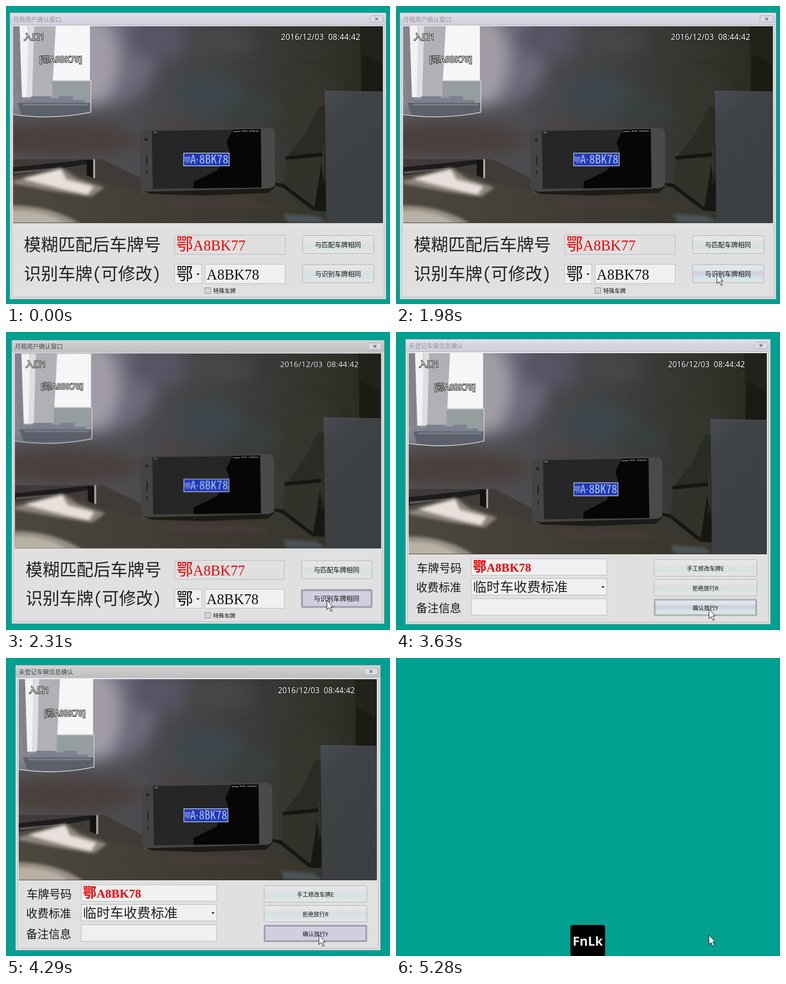
An HTML page for the animation above (6270 ms loop, 819x634 px).

```html
<!DOCTYPE html>
<html lang="zh-CN">
<head>
<meta charset="utf-8">
<title>车牌确认</title>
<style>
html, body { margin: 0; width: 100%; height: 100%; overflow: hidden; background: #00a090; }
svg { display: block; }
text { font-family: "Noto Sans CJK SC", "Noto Sans CJK", sans-serif; fill: #101010; white-space: pre; }
.half { font-family: "Noto Sans Mono CJK SC", "Noto Sans CJK SC", "DejaVu Sans Mono", monospace; }
.song { font-family: "Liberation Serif", "Noto Sans CJK SC", serif; }
.big { font-size: 36.6px; fill: #222; }
.value { font-size: 31px; }
.han { font-size: 36px; }
.mid { font-size: 24px; fill: #181818; }
.caption { font-size: 12.9px; fill: #9696a0; }
.caption.on { fill: #404850; font-weight: 500; }
.push { font-size: 14px; text-anchor: middle; }
.small { font-size: 12px; }
.red { fill: #f00000; }
.overlay { font: 17.3px "Noto Sans", "Noto Sans CJK SC", sans-serif; fill: #fff; stroke: #101010; stroke-width: 2px; paint-order: stroke; }
.button { fill: url(#plain); stroke: #a6aabc; }
.down { fill: #d0cfe0; stroke: #787a8c; }
.field { fill: #f0f0f0; stroke: #b2b4bc; }
.focus { fill: none; stroke: #181818; stroke-dasharray: 1 1; }

/* One loop is 19 ticks of 330 ms */
.step { animation: 6270ms step-end infinite; }
#match { animation-name: match; transform-origin: 409.5px 319px; }
#entry { animation-name: entry; }
#matchOn, #matchDown { animation-name: matchOn; }
#entryOn { animation-name: entryOn; }
#matchHover { animation-name: matchHover; }
#entryHover { animation-name: entryHover; }
#entryDown { animation-name: entryDown; }
#keyLock { animation-name: keyLock; }
#pointer { animation-name: pointer; }
@keyframes match {
  0% { visibility: visible; transform: none; }
  36.842% { visibility: visible; transform: scale(.99); }
  42.105%, 100% { visibility: hidden; transform: none; }
}
@keyframes matchOn { 0% { opacity: 0; } 36.842%, 100% { opacity: 1; } }
@keyframes matchHover { 0% { opacity: 0; } 31.578%, 100% { opacity: 1; } }
@keyframes entry { 0% { visibility: hidden; } 42.105% { visibility: visible; } 73.684%, 100% { visibility: hidden; } }
@keyframes entryHover { 0% { opacity: .7; } 47.368%, 100% { opacity: 1; } }
@keyframes entryOn { 0% { opacity: 0; } 63.157%, 100% { opacity: 1; } }
@keyframes entryDown { 0% { opacity: 0; } 68.421%, 100% { opacity: 1; } }
@keyframes keyLock { 0% { visibility: hidden; } 84.21%, 100% { visibility: visible; } }
@keyframes pointer {
  0% { opacity: 0; transform: translate(608px, 197px); }
  10.526% { opacity: 1; transform: translate(608px, 197px); }
  15.789% { transform: translate(383px, 315px); }
  21.052% { transform: translate(562px, 491px); }
  26.315% { transform: translate(668px, 554px); }
  31.578% { transform: translate(684px, 570px); }
  47.368% { transform: translate(670px, 586px); }
  57.894%, 100% { opacity: 1; transform: translate(667px, 589px); }
}
</style>
</head>
<body>
<svg width="819" height="634" viewBox="0 0 819 634">
<defs>
  <linearGradient id="plain" x2="0" y2="1">
    <stop stop-color="#e8e8ea"/><stop offset=".42" stop-color="#e0e0e2"/>
    <stop offset=".5" stop-color="#d2e2e2"/><stop offset=".75" stop-color="#dde2e2"/><stop offset="1" stop-color="#e6e6e6"/>
  </linearGradient>
  <linearGradient id="hover" x2="0" y2="1">
    <stop stop-color="#e2e8ea"/><stop offset=".3" stop-color="#dfe4e6"/>
    <stop offset=".4" stop-color="#d0d0e2"/><stop offset=".56" stop-color="#d2d2e2"/>
    <stop offset=".64" stop-color="#d0e2e2"/><stop offset="1" stop-color="#e0e8e8"/>
  </linearGradient>
  <linearGradient id="barOff" x2="0" y2="1"><stop stop-color="#e2e2e6"/><stop offset=".5" stop-color="#d6d6e2"/><stop offset="1" stop-color="#d0d0e0"/></linearGradient>
  <linearGradient id="barOn" x2="0" y2="1"><stop stop-color="#d4d4d4"/><stop offset=".5" stop-color="#c8c8c8"/><stop offset="1" stop-color="#c0c0c0"/></linearGradient>
  <linearGradient id="wall"><stop stop-color="#58565a"/><stop offset=".35" stop-color="#4c4b50"/><stop offset=".6" stop-color="#3d3e3e"/><stop offset=".85" stop-color="#32322a"/><stop offset="1" stop-color="#28281f"/></linearGradient>
  <linearGradient id="desk"><stop stop-color="#4c483e"/><stop offset=".5" stop-color="#3f3b32"/><stop offset="1" stop-color="#34332a"/></linearGradient>
  <linearGradient id="box" x2=".4" y2="1"><stop stop-color="#484d54"/><stop offset=".25" stop-color="#404346"/><stop offset="1" stop-color="#3c3f42"/></linearGradient>
  <linearGradient id="glass" x2="0" y2="1"><stop stop-color="#9a98a8"/><stop offset=".75" stop-color="#9298a0"/><stop offset="1" stop-color="#70747e"/></linearGradient>
  <filter id="soft" x="-50%" y="-50%" width="200%" height="200%"><feGaussianBlur stdDeviation="16"/></filter>
  <filter id="blur" x="-20%" y="-30%" width="140%" height="160%"><feGaussianBlur stdDeviation="3"/></filter>

  <symbol id="camera" viewBox="15 43 788 418" preserveAspectRatio="none">
    <path fill="url(#wall)" d="M15 43H803V461H15Z"/>
    <g filter="url(#soft)">
      <ellipse cx="205" cy="110" rx="115" ry="105" fill="#6c6a7c"/>
      <ellipse cx="180" cy="115" rx="60" ry="95" fill="#a09ba6"/>
      <ellipse cx="330" cy="70" rx="70" ry="45" fill="#555464"/>
      <ellipse cx="430" cy="190" rx="75" ry="45" fill="#3e464c"/>
      <ellipse cx="530" cy="220" rx="60" ry="22" fill="#38413c"/>
      <ellipse cx="450" cy="75" rx="80" ry="30" fill="#46464a"/>
      <ellipse cx="110" cy="285" rx="175" ry="38" fill="#493f3e"/>
      <ellipse cx="360" cy="250" rx="45" ry="12" fill="#4b4141"/>
      <ellipse cx="650" cy="215" rx="60" ry="70" fill="#34352d"/>
    </g>
    <path fill="#22221b" d="M755 43H803V182H757Z"/>
    <path fill="#17170f" d="M760 102l43 22v58h-46Z" opacity=".6"/>

    <path fill="url(#glass)" d="M15 43H180V227Q100 243 15 231Z"/>
    <path fill="#86828c" d="M15 43H34L37 194L26 222 15 190Z"/>
    <path fill="#b0b0b6" d="M60 43H106L100 160 99 194H56Z"/>
    <path fill="#f2f2f2" d="M29 43H47L48 194H34Z"/>
    <path fill="#dedee2" d="M48 43H60L56 194H44Z"/>
    <path fill="#f6f6f6" d="M106 43H179V158H100Z"/>
    <path fill="#969d9e" d="M99 160H179V206H99Z"/>
    <path fill="#7c8090" d="M36 199h18v-7h42v4h17v-4h30v8h25v6H37Z"/>
    <path fill="#5c606a" d="M24 206H179V226Q100 241 32 231Z"/>
    <path fill="#777b88" d="M35 208H175v4H35Z"/>
    <path fill="none" stroke="#dadade" stroke-width="1.5" d="M15 231Q100 243 181 226V159H100"/>
    <path fill="none" stroke="#d0d0d4" stroke-dasharray="1 3" d="M17 150Q22 200 33 230"/>

    <path fill="url(#desk)" d="M15 360L120 344 190 366H290V398H575L655 436 803 440V461H15Z"/>
    <path fill="#403b38" d="M15 326H205L295 370 290 394 200 374 120 343 15 361Z"/>
    <path fill="#1c1c1c" d="M15 343L173 327V336L120 345 15 360Z"/>
    <path fill="#555353" d="M17 352l96-8v3l-96 11Z"/>
    <path fill="#131313" d="M172 327h14v39l-14-6Z"/>
    <path fill="#aca8a0" d="M186 326h4v40h-4Z"/>
    <g filter="url(#blur)">
      <path fill="#8c857e" d="M15 372L118 344 150 366 210 386 182 406 100 394 15 378Z"/>
      <path fill="#e8e1db" d="M36 367L117 347 128 369 186 384 174 401 128 391 80 379Z"/>
      <path fill="#958f85" d="M10 424Q100 424 162 466H10Z"/>
      <path fill="#b8b1a6" d="M10 436Q85 432 130 466H10Z"/>
      <path fill="#4b3f3b" d="M330 410H520L570 430H360Z" opacity=".6"/>
      <path fill="#4c555a" d="M592 442L665 447 685 461H600Z"/>
    </g>

    <path fill="#2b2b25" d="M595 326L640 270 668 213H682V380L660 318Z"/>
    <path fill="#33322a" d="M597 325L675 317 670 340 658 431 592 383Z"/>
    <path fill="#171713" d="M574 376L592 378 658 428 672 340 682 380V437L655 435 590 386 574 382Z"/>
    <path fill="#151511" d="M595 320l80-8v8l-78 7Z"/>
    <path fill="url(#box)" d="M680 181L803 183V461H684Z"/>
    <path fill="none" stroke="#5c6167" d="M680 181L803 183"/>
    <path fill="none" stroke="#6a6a65" stroke-width="2" stroke-dasharray="1 3" d="M676 300V380"/>

    <path fill="#1c1b18" d="M292 394L575 384 560 398 420 403 310 400Z"/>
    <path fill="#444443" d="M300 263L560 258Q574 258 574 272V374Q574 387 560 388L303 395Q287 394 287 380L286 277Q287 264 300 263Z"/>
    <path fill="#565656" d="M545 260h15q13 1 13 14v98q0 14-14 15h-14Z" opacity=".35"/>
    <path fill="#262626" d="M311 266L543 262 545 386 313 389Z"/>
    <path fill="#060606" d="M484 263L543 262 545 386 400 388 400 374 450 350 477 310 470 290Z"/>
    <circle cx="299" cy="284" r="3" fill="#222"/>
    <path stroke="#252525" stroke-width="3" d="M300 318v20M300 350v8"/>
    <path stroke="#a0a0a0" stroke-width="2" stroke-dasharray="3 1 2 1" d="M485 267h15M503 266h12M519 266h20M315 269h7"/>
    <path fill="#2338bd" stroke="#c8d2d8" stroke-width="1.5" d="M379 313H476V340H379Z"/>
    <text class="half" x="380" y="332" font-size="14" style="fill:#a8c4e0">鄂</text>
    <text class="half" x="393" y="335" font-size="24" style="fill:#a8c4e0">A</text>
    <circle cx="408" cy="327" r="1.5" fill="#a8c4e0"/>
    <text class="half" x="412" y="335" font-size="25" style="fill:#a8c4e0">8BK78</text>

    <text class="overlay" x="38" y="72">入口1</text>
    <text class="overlay" x="71" y="120">[鄂A8BK78]</text>
    <text class="overlay" x="586" y="72">2016/12/03  08:44:42</text>
  </symbol>

  <g id="close">
    <rect x=".5" y=".5" width="28" height="14" rx="3" fill="#dcdce4" stroke="#a4a4b2"/>
    <path d="M11.5 4.5l6 6m0-6l-6 6" stroke="#666874" stroke-width="1.7"/>
  </g>
</defs>

<g id="match" class="step">
  <rect x="8.5" y="14.5" width="802" height="609" fill="#e0e0e0" stroke="#a8a8b2"/>
  <path fill="url(#barOff)" d="M9 15H810V40H9Z"/>
  <text class="caption" x="15" y="32.5">月租用户确认窗口</text>
  <g id="matchOn" class="step">
    <path fill="url(#barOn)" d="M9 15H810V40H9Z"/>
    <text class="caption on" x="15" y="32.5">月租用户确认窗口</text>
  </g>
  <use href="#close" x="776" y="20"/>
  <rect x="12.5" y="40.5" width="794" height="579" fill="none" stroke="#b0b0bc"/>
  <path fill="#f4f4f4" d="M14 42H805V463H14Z"/>
  <path fill="#303030" d="M15 43H804V462H15Z"/>
  <use href="#camera" x="15" y="43" width="788" height="418"/>

  <text class="big half" x="38" y="521">模糊匹配后车牌号</text>
  <text class="big half" x="38" y="583">识别车牌(可修改)</text>
  <rect x="359.5" y="487.5" width="236" height="41" class="field" style="fill:#e0e0e0"/>
  <text class="value song red" x="363" y="520"><tspan class="han">鄂</tspan>A8BK77</text>
  <rect x="359.5" y="549.5" width="58" height="41" class="field"/>
  <text class="han" x="363" y="583">鄂</text>
  <path d="M406 569h7l-3.5 4Z" fill="#202030"/>
  <rect x="424.5" y="549.5" width="171" height="41" class="field"/>
  <text class="value song" x="428" y="582">A8BK78</text>
  <rect x="424.5" y="599.5" width="12" height="12" fill="#e8e8e8" stroke="#787a84"/>
  <rect x="426.5" y="601.5" width="8" height="8" fill="#d6dada" stroke="#c0c4c8"/>
  <text class="small" x="442" y="611">特殊车牌</text>

  <rect x="632.5" y="488.5" width="152" height="38" rx="2" class="button"/>
  <text class="push" x="708" y="513">与匹配车牌相同</text>
  <rect x="632.5" y="550.5" width="152" height="38" rx="2" class="button"/>
  <rect id="matchHover" class="step" x="632.5" y="550.5" width="152" height="38" rx="2" fill="url(#hover)" stroke="#a6aabc"/>
  <g id="matchDown" class="step">
    <rect x="632.5" y="550.5" width="152" height="38" rx="2" class="down"/>
    <rect x="634.5" y="552.5" width="148" height="34" class="focus"/>
  </g>
  <text class="push" x="708" y="575">与识别车牌相同</text>
</g>

<g id="entry" class="step">
  <rect x="20.5" y="15.5" width="778" height="606" fill="#e0e0e0" stroke="#a8a8b2"/>
  <path fill="url(#barOff)" d="M21 16H798V41H21Z"/>
  <text class="caption" x="27" y="33.5">未登记车辆信息确认</text>
  <g id="entryOn" class="step">
    <path fill="url(#barOn)" d="M21 16H798V41H21Z"/>
    <text class="caption on" x="27" y="33.5">未登记车辆信息确认</text>
  </g>
  <use href="#close" x="764" y="21"/>
  <rect x="24.5" y="41.5" width="770" height="576" fill="none" stroke="#b0b0bc"/>
  <path fill="#f4f4f4" d="M26 44H792V474H26Z"/>
  <path fill="#303030" d="M27 45H791V473H27Z"/>
  <use href="#camera" x="27" y="45" width="763" height="427"/>

  <text class="mid" x="44" y="511">车牌号码</text>
  <text class="mid" x="43" y="552">收费标准</text>
  <text class="mid" x="43" y="596">备注信息</text>
  <rect x="160.5" y="482.5" width="289" height="35" class="field"/>
  <rect x="160.5" y="524.5" width="289" height="35" class="field"/>
  <rect x="160.5" y="567.5" width="289" height="35" class="field"/>
  <text class="song red" x="164" y="510" font-size="26" font-weight="700"><tspan font-size="29">鄂</tspan>A8BK78</text>
  <text x="164" y="553" font-size="28.9" style="fill:#222">临时车收费标准</text>
  <path d="M438 541h7l-3.5 4Z" fill="#202030"/>

  <rect x="550.5" y="484.5" width="219" height="35" rx="2" class="button"/>
  <text class="push small" x="660" y="507.5">手工修改车牌E</text>
  <rect x="550.5" y="526.5" width="219" height="35" rx="2" class="button"/>
  <text class="push small" x="660" y="549.5">拒绝放行R</text>
  <rect x="550.5" y="568.5" width="219" height="35" rx="2" class="button"/>
  <rect id="entryHover" class="step" x="550.5" y="568.5" width="219" height="35" rx="2" fill="url(#hover)" stroke="#8a8c9c"/>
  <rect id="entryDown" class="step down" x="550.5" y="568.5" width="219" height="35" rx="2"/>
  <rect x="552.5" y="570.5" width="215" height="31" class="focus"/>
  <text class="push small" x="660" y="591.5">确认放行Y</text>
</g>

<g id="keyLock" class="step">
  <rect x="372" y="568" width="74" height="67" rx="5"/>
  <text x="409" y="612" text-anchor="middle" style="font:700 27px 'Open Sans',sans-serif;fill:#f0f0f0">FnLk</text>
</g>

<path id="pointer" class="step" d="M.5 .5V20.5L5 16.3L9 24.5L12 23L8.3 15H14Z" fill="#fff" stroke="#000"/>
</svg>
</body>
</html>
```
